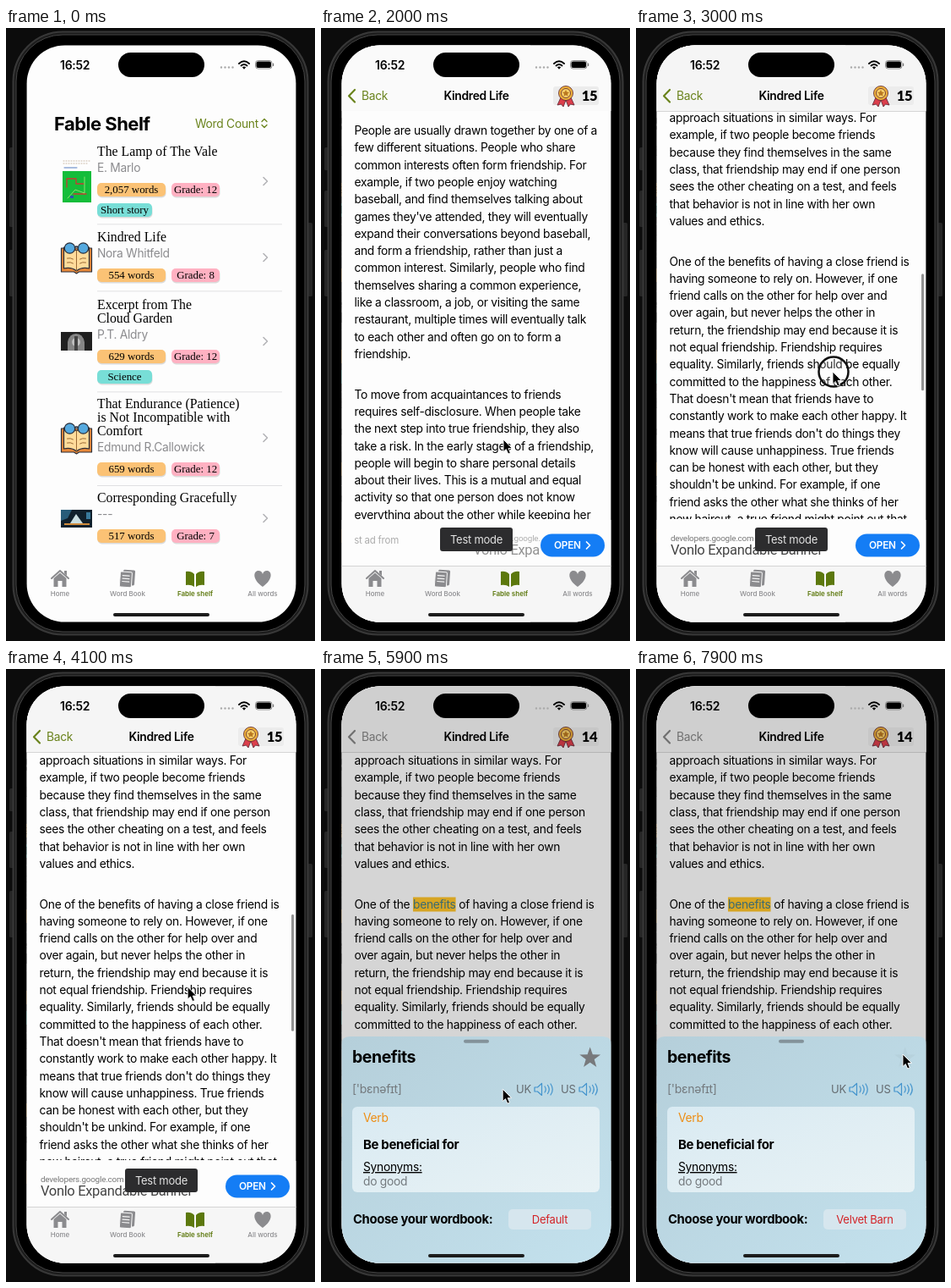
Animation, 366 px wide and 724 px high, one loop 8 s. Source, as an HTML page:

```html
<!DOCTYPE html>
<html lang="en">
<head>
<meta charset="utf-8">
<title>Reading app</title>
<style>
html, body { margin: 0; width: 100%; height: 100%; overflow: hidden; background: #0c0c0c; }
svg { display: block; width: 100%; height: 100%; }
text { font: 13.8px Inter, sans-serif; letter-spacing: -.02em; white-space: pre; }
.serif { font: 15.8px "Liberation Serif", serif; letter-spacing: 0; }
.pill { font: 12.9px "Liberation Serif", serif; letter-spacing: 0; }
.tab { font-size: 8px; font-weight: 500; letter-spacing: 0; }
.semi { font-weight: 600; }
.bold { font-weight: 700; letter-spacing: -.024em; }
.mid { text-anchor: middle; }
.line { fill: none; stroke-linecap: round; stroke-linejoin: round; }
#menu { filter: drop-shadow(0 3px 16px #1d486066); }
</style>
</head>
<body>
<svg id="stage" viewBox="0 0 366 724" xmlns="http://www.w3.org/2000/svg"></svg>
<script>
const GREEN = '#6a831c', GREY = '#8b8b8e';
const text = (x, y, s, cls = '', extra = '') => `<text x="${x}" y="${y}" class="${cls}" ${extra}>${s}</text>`;
const rect = (x, y, w, h, fill, r = 0, extra = '') =>
  `<rect x="${x}" y="${y}" width="${w}" height="${h}" rx="${r}" fill="${fill}" ${extra}/>`;
const path = (d, stroke, width = 1.5, extra = '') =>
  `<path class="line" d="${d}" stroke="${stroke}" stroke-width="${width}" ${extra}/>`;
const shape = (d, fill, extra = '') => `<path d="${d}" fill="${fill}" ${extra}/>`;
const circle = (x, y, r, fill, extra = '') => `<circle cx="${x}" cy="${y}" r="${r}" fill="${fill}" ${extra}/>`;
const group = (id, body, extra = '') => `<g id="${id}" ${extra}>${body}</g>`;

const story = `People are usually drawn together by one of a
few different situations. People who share
common interests often form friendship. For
example, if two people enjoy watching
baseball, and find themselves talking about
games they've attended, they will eventually
expand their conversations beyond baseball,
and form a friendship, rather than just a
common interest. Similarly, people who find
themselves sharing a common experience,
like a classroom, a job, or visiting the same
restaurant, multiple times will eventually talk
to each other and often go on to form a
friendship.

To move from acquaintances to friends
requires self-disclosure. When people take
the next step into true friendship, they also
take a risk. In the early stages of a friendship,
people will begin to share personal details
about their lives. This is a mutual and equal
activity so that one person does not know
everything about the other while keeping her
own life private. Friends balance what they
give with what they receive.

Many people choose friends with a similar
outlook. Friends are likely to stay close
when they agree about what matters and
hold the same beliefs about right and
wrong, because then they will usually
approach situations in similar ways. For
example, if two people become friends
because they find themselves in the same
class, that friendship may end if one person
sees the other cheating on a test, and feels
that behavior is not in line with her own
values and ethics.

One of the benefits of having a close friend is
having someone to rely on. However, if one
friend calls on the other for help over and
over again, but never helps the other in
return, the friendship may end because it is
not equal friendship. Friendship requires
equality. Similarly, friends should be equally
committed to the happiness of each other.
That doesn't mean that friends have to
constantly work to make each other happy. It
means that true friends don't do things they
know will cause unhappiness. True friends
can be honest with each other, but they
shouldn't be unkind. For example, if one
friend asks the other what she thinks of her
new haircut, a true friend might point out that
it is not the best style for her.`.split('\n');

let lineY = 126, wordY = 0;
const storyText = story.map(s => {
  if (!s) { lineY += 27.4; return ''; }
  const hit = s.includes('benefits');
  if (hit) wordY = lineY;
  const out = text(39.5, lineY.toFixed(1), s, '', hit ? 'id="hitLine"' : '');
  lineY += 20.3;
  return out;
}).join('');

// Story list: title lines, first title middle, author, words, grade, tag, chevron y
const rows = [
  [['The Lamp of The Vale'], 146, 'E. Marlo', '2,057', 12, 'Short story', 181],
  [['Kindred Life'], 247, 'Nora Whitfeld', '554', 8, '', 271],
  [['Excerpt from The', 'Cloud Garden'], 327, 'P.T. Aldry', '629', 12, 'Science', 370],
  [['That Endurance (Patience)', 'is Not Incompatible with', 'Comfort'], 444, 'Edmund R.Callowick', '659', 12, '', 484],
  [['Corresponding Gracefully'], 555, '---', '517', 7, '', 579]
];
const pill = (x, y, w, fill, s) =>
  rect(x + .5, y - 6.5, w, 16, '#0002', 5) + rect(x, y - 8, w, 16, fill, 5) +
  text(x + w / 2, y + 4, s, 'pill mid');
const row = ([title, y, author, words, grade, tag, arrow]) => {
  const end = y + 16 * (title.length - 1), p = end + 45;
  return title.map((s, i) => text(108, y + 5 + 16 * i, s, 'serif')).join('') +
    text(108, end + 24.3, author, '', `fill="${GREY}"`) +
    pill(108, p, 81, '#fbc275', words + ' words') + pill(196, p, 57, '#ffb1c2', 'Grade: ' + grade) +
    (tag && pill(108, p + 24, 65, '#78ded7', tag)) +
    path(`M305 ${arrow - 4.5}l4.5 4.5l-4.5 4.5`, '#b4b4b7', 1.6);
};
const bookIcon = y => `<g transform="translate(83.5 ${y})" stroke="#2b2f3a" stroke-width="1.2" stroke-linejoin="round">` +
  shape('M-18-11H18V17H3L0 19L-3 17H-18Z', '#e8893a') +
  shape('M0-8Q-7-14-15-12V13Q-6 11 0 16Q6 11 15 13V-12Q7-14 0-8Z', '#ffdc9b') +
  path('M0-8V16M-11 1Q-7 0-4 2M-11 6Q-7 5-4 7M11 1Q7 0 4 2M11 6Q7 5 4 7', '#9a6a34', 1) +
  circle(-8, -11, 6.2, '#55a9df') + circle(8, -11, 6.2, '#55a9df') + path('M-2-12Q0-14 2-12', '#2b2f3a', 1.6) + '</g>';
const thumbs =
  path('M68 157H101M68 160H97', '#c8b7a4', 1, 'stroke-dasharray="1 2"') + path('M69 165H84', '#557dc0', 1) +
  rect(67, 169, 34, 37, '#14bd3a') + path('M72 188V178H83V184H92M80 196H95', '#c63b35', 1.3) +
  path('M73 201L82 191L93 195V176', '#8ce06c', 1) + rect(76, 198, 4, 3, '#3050b4') +
  bookIcon(271) + bookIcon(484) +
  rect(65, 359, 37, 22, '#202020') + shape('M73 381V371Q75 361 83 361T93 371V381Z', '#858585') +
  circle(83, 371, 5, '#bdbdbd') + rect(81, 364, 4, 17, '#424242') +
  rect(65, 569, 37, 21, '#10202c') + shape('M65 569H78L73 579L65 582Z', '#275c79') +
  shape('M76 585L83 574L91 585Z', '#c9dde0') + rect(69, 585, 30, 2, '#d08b3c') + rect(95, 572, 5, 8, '#38799b');

const list = rect(24, 20, 320, 683, '#fdfdfd') + text(57, 121, 'Fable Shelf', 'bold', 'style="font-size:22px"') +
  text(224, 117.5, 'Word Count', '', `fill="${GREEN}"`) +
  path('M303 110.5l3-3l3 3M303 114.5l3 3l3-3', GREEN, 1.3) +
  group('pressed', rect(24, 232, 320, 78, '#dedee0')) + rows.map(row).join('') + thumbs +
  [231.5, 310.5, 429.5, 540].map(y => rect(108, y, 219, .8, '#dadadc')).join('');

const medal = rect(275, 69, 54, 22, '#ececec', 3) +
  '<g stroke="#5a2330" stroke-width=".8" stroke-linejoin="round">' +
  shape('M284 82L280 91L284.5 90L287 93L290 85L293 93L295.5 90L300 91L296 82Z', '#dc3f4c') +
  circle(290, 77, 8.5, '#efb23a') + circle(290, 77, 5.5, '#f9d26b') + '</g>' +
  shape('M290 73l1.2 2.6l2.8.3l-2 1.9l.6 2.8l-2.6-1.4l-2.6 1.4l.6-2.8l-2-1.9l2.8-.3Z', '#b97820') +
  text(318, 85.5, '15', 'mid', 'id="count" style="font:900 16.5px Lato,sans-serif"');

const page = rect(24, 20, 320, 683, '#fdfdfd') +
  `<g clip-path="url(#reader)">${group('scroller', rect(0, 0, 0, 17, '#ffc42a', 0, 'id="mark"') + storyText)}</g>` +
  rect(338, 0, 3, 138, '#929292', 1.5, 'id="thumb"') +
  rect(24, 20, 320, 78, '#fafafa') + group('navShade', rect(24, 20, 320, 78, '#f5f5f5') + rect(24, 98, 320, .7, '#c6c6c6')) +
  group('back', path('M40 73l-7 7.2l7 7.2', 'currentColor', 2.2) + text(48, 85, 'Back', '', 'fill="currentColor"')) +
  text(184, 85, 'Kindred Life', 'semi mid') + medal +
  group('ad', rect(24, 581, 320, 55, '#fdfdfd') + '<g clip-path="url(#adArea)">' +
    group('adOld', text(92, 608.5, 'Nice job! This is a test ad from', '', 'text-anchor="end" fill="#777" style="font-size:11.5px"')) +
    group('adNew', text(41, 606, 'developers.google.com', '', 'fill="#777" style="font:9.9px Roboto,sans-serif"') +
      text(41, 622, 'Vonlo Expandable Banner', '', 'fill="#444" style="font:16.5px Roboto,sans-serif"')) + '</g>' +
    rect(260, 597.5, 76, 27, '#147df5', 13.5) + text(276, 615.3, 'OPEN', 'semi', 'fill="#fff" style="font-size:11.8px"') +
    path('M314.5 607l4 4l-4 4', '#fff', 1.7) +
    rect(141, 590, 86, 28, '#2c2c2e', 3) + text(184, 608.5, 'Test mode', 'mid', 'fill="#e2e2e2" style="font-size:13px"'));

const label = (x, s, on) => text(x, 670.5, s, 'tab mid' + (on ? ' semi' : ''), `fill="${on ? '#5c780d' : GREY}"`);
const tabs = group('tabShade', rect(24, 635, 320, 68, '#f6f6f6') + rect(24, 635, 320, .7, '#c6c6c6')) +
  path('M54 650L64 641L74 650', GREY, 2) + shape('M56.5 650L64 643.5L71.5 650V660H66.5V653H61.5V660H56.5ZM69 641H72V647L69 644Z', GREY) +
  label(64, 'Home') +
  `<g transform="rotate(4 144 650)">${rect(138.5, 640, 14, 18, GREY, 1.5)}${rect(135, 642.5, 14, 18, GREY, 1.5, 'stroke="#f8f8f8"')}` +
  path('M138 647H146M138 650.5H146M138 654H146', '#f4f4f4', 1.1) + '</g>' + label(144, 'Word Book') +
  shape('M223 645Q219 641 213 642V658Q219 657 223 660ZM225 645Q229 641 235 642V658Q229 657 225 660Z', '#5c780d') + label(224, 'Fable shelf', true) +
  shape('M304 660C291 651 293 641 299 641Q303 641 304 645Q305 641 309 641C315 641 317 651 304 660Z', GREY) + label(304, 'All words');

const speaker = x => path(`M${x} 494h3.5l5-4.5v14l-5-4.5h-3.5ZM${x + 12} 493q2.5 3.5 0 7M${x + 15.5} 491.5q3.5 5 0 10M${x + 19} 490q4.5 6.5 0 13`, '#4494cd', 1.2);
const star = Array.from({ length: 10 }, (_, i) => {
  const a = Math.PI * (i / 5 - .5), r = i % 2 ? 5.3 : 13;
  return `${(318.7 + r * Math.cos(a)).toFixed(1)},${(459.5 + r * Math.sin(a)).toFixed(1)}`;
}).join(' ');
const sheet = shape('M24 724V444Q24 434 34 434H334Q344 434 344 444V724Z', 'url(#sky)') +
  rect(169, 437.7, 30, 4, '#83929a', 2) + text(37, 465, 'benefits', 'bold', 'style="font-size:19.5px"') +
  `<polygon id="star" points="${star}" fill="#77797c"/><polygon id="flash" points="${star}" fill="url(#blush)"/>` +
  text(37, 501, "['bɛnəfɪt]", '', 'fill="#747a7e" style="font-size:14px"') +
  text(231, 501, 'UK', '', 'fill="#646b70" style="font-size:13px"') + speaker(253) +
  text(284, 501, 'US', '', 'fill="#646b70" style="font-size:13px"') + speaker(306) +
  rect(37, 517, 293, 101, 'url(#card)', 6) + text(50, 534.5, 'Verb', '', 'fill="#ed8d13"') +
  text(50, 566.5, 'Be beneficial for', 'bold', 'style="font-size:15px"') +
  text(50, 593, 'Synonyms:', '', 'text-decoration="underline"') + text(50, 610, 'do good', '', 'fill="#747a7e"') +
  text(38, 655, 'Choose your wordbook:', 'bold', 'style="font-size:14.8px"') +
  rect(222, 638, 98, 24, '#d6e6ee', 5, 'id="button"') + text(271, 654.7, '', 'mid', 'id="choice" style="font-size:13px"') +
  group('menu', rect(130, 561, 203, 70, '#eff5f7', 9) + rect(130, 596, 203, .8, '#cfd8dc') +
    path('M141 579.5l3 3.5l5.5-8', '#111', 1.5) + text(156, 584, 'Default') + text(156, 619, 'Velvet Barn'));

const status = text(64, 48.5, '16:52', 'semi', 'style="font-size:14px"') + rect(133, 29, 102, 29, '#000', 14.5) +
  [255, 259.5, 264, 268.5].map(x => circle(x, 46.5, 1.2, '#aaa')).join('') +
  path('M276 42Q282 36.5 288 42M278.5 44.5Q282 41.5 285.5 44.5', '#000', 1.9) + shape('M279.8 46.3Q282 44.7 284.2 46.3L282 48.8Z', '#000') +
  rect(295.5, 38.5, 19.5, 9.5, 'none', 3, 'stroke="#777" stroke-width=".8"') + rect(296.5, 39.5, 17.5, 7.5, '#000', 2) + rect(316, 41.5, 1.2, 3.5, '#777', .6) +
  rect(127, 691, 114, 4, '#1c1c1c', 2);

const buttons = [[4, 141, 27], [4, 192, 43], [4, 262, 55], [357, 230, 87]]
  .map(([x, y, h]) => rect(x, y, 6, h, '#262626', 1.5)).join('');
const grad = (id, a, b) => `<linearGradient id="${id}" x2="1" y2="1"><stop stop-color="${a}"/><stop offset="1" stop-color="${b}"/></linearGradient>`;
const clip = (id, ...box) => `<clipPath id="${id}">${rect(...box)}</clipPath>`;

document.getElementById('stage').innerHTML =
  `<defs>${grad('sky', '#b5cfda', '#c4e2ee')}${grad('card', '#d9eaf2', '#e8f2f5')}
  <linearGradient id="blush"><stop offset=".5" stop-color="#77797c"/><stop offset=".8" stop-color="#a0605e"/></linearGradient>
  ${clip('screen', 24.6, 20.4, 318.8, 681.2, '#000', 45)}${clip('reader', 24, 98, 320, 482)}${clip('adArea', 40, 582, 220, 53)}</defs>` +
  rect(0, 0, 366, 724, '#0c0c0c') + buttons +
  rect(8.5, 4.5, 349, 712, '#1c1c1c', 59, 'stroke="#383838" stroke-width="2"') +
  rect(12, 8, 342, 705, '#000', 55, 'stroke="#444"') +
  `<g clip-path="url(#screen)">${group('list', list)}${group('page', page)}${tabs}` +
  rect(24, 20, 320, 683, '#000', 0, 'id="dim"') + group('sheet', sheet) + status + '</g>' +
  group('cursor', circle(1, 0, 17.5, '#ffffff30', 'id="touch" stroke="#111" stroke-width="2.5"') +
    shape('M0 0V14.5L3.3 11.5L5.7 17L8.3 15.9L6 10.5H10.5Z', '#000', 'stroke="#fff" stroke-width=".9"'));

const $ = Object.fromEntries([...document.querySelectorAll('[id]')].map(e => [e.id, e]));
const set = (e, attrs) => { for (const k in attrs) e.setAttribute(k, attrs[k]); };
const fade = (e, v) => e.setAttribute('opacity', v);
const move = (e, x, y = 0) => e.setAttribute('transform', `translate(${x} ${y})`);
const ramp = (t, a, b) => Math.min(1, Math.max(0, (t - a) / (b - a)));
const smooth = k => k * k * (3 - 2 * k);
// Critically damped spring: remaining distance from 1 to 0
const spring = (t, start) => { const x = Math.max(0, t - start) / 70; return (1 + x) * Math.exp(-x); };
const within = (t, ...spans) => +spans.some(([a, b]) => t >= a && t < b);

const track = [[100, 280, 700], [850, 215, 268], [1450, 215, 268], [1850, 216, 486], [2100, 216, 486],
  [2350, 225, 310], [2500, 226, 300], [2850, 233, 407], [3150, 233, 405], [3700, 217, 378], [4080, 217, 378],
  [4300, 146, 281], [5650, 146, 281], [6100, 264, 648], [6300, 264, 648], [6650, 196, 613], [6950, 196, 613], [7650, 316, 455], [8000, 316, 455]];
function pointer(t) {
  const i = track.findIndex(k => k[0] > t);
  if (i < 1) return track[0].slice(1);
  const [a, b] = [track[i - 1], track[i]], k = smooth(ramp(t, a[0], b[0]));
  return [a[1] + (b[1] - a[1]) * k, a[2] + (b[2] - a[2]) * k];
}
function scrollAt(t) {
  if (t < 2350) return 176 * smooth(ramp(t, 2100, 2350));
  return 176 + 482.5 * (1 - (1 - ramp(t, 2350, 2950)) ** 3) - 2 * smooth(ramp(t, 3050, 3300));
}

function placeMark() {
  const at = $.hitLine.textContent.indexOf('benefits');
  set($.mark, { x: 39.5 + $.hitLine.getSubStringLength(0, at), y: wordY - 13, width: $.hitLine.getSubStringLength(at, 8) });
  $.hitLine.innerHTML = $.hitLine.textContent.replace('benefits', '<tspan id="word">benefits</tspan>');
  $.word = document.getElementById('word');
}

function draw(t) {
  const push = spring(t, 1100), up = spring(t, 4400), tapped = t >= 4350, scroll = scrollAt(t);
  move($.list, -96 * (1 - push));
  move($.page, 322 * push);
  fade($.pressed, within(t, [1000, 1700]));
  fade($.tabShade, 1 - push);
  move($.scroller, 0, -scroll);
  fade($.navShade, ramp(scroll, 0, 20));
  set($.thumb, { y: 100 + scroll * .289, opacity: ramp(t, 2100, 2200) * (1 - ramp(t, 5000, 5300)) });
  fade($.ad, ramp(t, 1550, 1700));
  const slide = t < 2000 ? .4 * ramp(t, 1850, 2000) : .4 + .6 * smooth(ramp(t, 2000, 2350));
  move($.adOld, -232 * (slide - .4));
  fade($.adOld, 1 - slide);
  move($.adNew, 232 * (1 - slide));
  fade($.adNew, slide < .1 ? 0 : .3 + .7 * slide);

  fade($.mark, +tapped);
  $.word.setAttribute('fill', tapped ? '#467e86' : '#000');
  $.count.textContent = tapped ? 14 : 15;
  $.back.setAttribute('color', t > 4400 ? '#858585' : GREEN);
  fade($.dim, .155 * (1 - up));
  move($.sheet, 0, 290 * up);
  fade($.flash, 1 - ramp(t, 4900, 5150));
  fade($.star, 1 - .93 * ramp(t, 7750, 7900));

  const menu = smooth(ramp(t, 6200, 6400)) * (1 - smooth(ramp(t, 6800, 7000)));
  fade($.menu, menu);
  set($.menu, { transform: `translate(271 631) scale(${.4 + .6 * menu}) translate(-271 -631)` });
  $.choice.textContent = t < 6850 ? 'Default' : 'Velvet Barn';
  $.choice.setAttribute('fill', menu > .3 ? '#9aabb2' : '#d32226');
  fade($.button, 1 - .8 * menu);

  move($.cursor, ...pointer(t));
  fade($.cursor, +(t >= 100));
  fade($.touch, within(t, [950, 1100], [2100, 2400], [2880, 3150], [4300, 4420], [6120, 6240], [6740, 6850], [7700, 7800]));
}

placeMark();
const loop = () => { draw(performance.now() % 8000); requestAnimationFrame(loop); };
loop();
</script>
</body>
</html>
```
